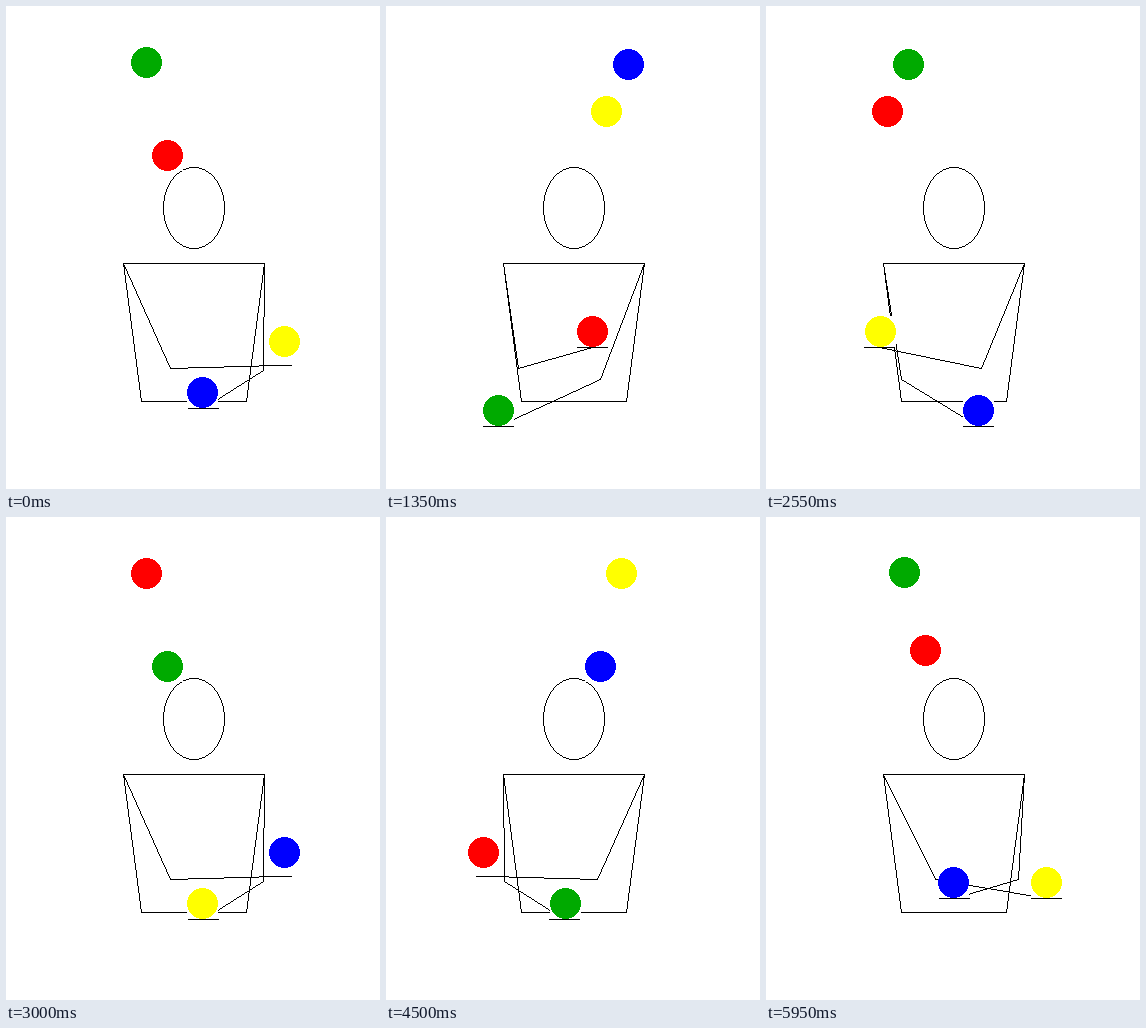
Animation of 374x483 px, one loop 6 s. Source, as an HTML page with a canvas:

```html
<!DOCTYPE html>
<html lang="en">
<head>
<meta charset="utf-8">
<title>Juggler</title>
<style>
html, body { margin: 0; width: 100%; height: 100%; overflow: hidden; background: #fff; }
canvas { display: block; }
</style>
</head>
<body>
<canvas id="stage" width="374" height="483"></canvas>
<script>
const ctx = document.getElementById('stage').getContext('2d');
const LOOP = 6000, STEP = 50, BEAT = 500;
const MID = 187.5, HAND_Y = 381, BALL_Y = 365, SWING = 61, HEIGHT = 310;
const REACH = 92.99, CATCH = 7.8;
// Left hand offsets from the middle: throw, catch, throw, ...
const SPOTS = [REACH, -CATCH, REACH, 0, -REACH, CATCH];
const COLORS = ['#ff0', '#0a0', '#00f', '#f00'];

const lerp = (a, b, u) => a + (b - a) * u;
const arc = u => 4 * u * (1 - u);
const mod = (a, n) => ((a % n) + n) % n;
const side = off => off > 0 ? 1 : -1;
const snapHand = off => side(off) * (Math.floor(Math.abs(off)) + 0.5);
const snapBall = off => side(off) * (Math.floor(Math.abs(off) + 0.5) - 0.5);

// Left hand; the right one is its mirror image three beats later.
function hand(time) {
  const p = mod(time, LOOP / 2) / BEAT;
  const i = Math.floor(p), u = p - i;
  return {
    off: lerp(SPOTS[i], SPOTS[(i + 1) % 6], u),
    y: Math.floor(HAND_Y + (i % 2 ? 1 : -1) * SWING * arc(u))
  };
}

function ball(time) {
  const t = mod(time, LOOP);
  const start = t < 3500 ? 0 : 3500;
  const u = (t - start) / 2000;
  if (u < 1) {
    return {
      off: snapBall(lerp(REACH, CATCH, u)),
      y: Math.round(BALL_Y - HEIGHT * arc(u))
    };
  }
  const right = start === 0;
  const h = hand(right ? t + 1500 : t);
  return { off: snapBall(h.off) * (right ? -1 : 1), y: h.y - 16 };
}

// Hard-edged line, one pixel wide
function line(x0, y0, x1, y1) {
  const n = Math.max(Math.abs(x1 - x0), Math.abs(y1 - y0)) || 1;
  for (let i = 0; i <= n; i++) {
    ctx.fillRect(Math.round(lerp(x0, x1, i / n)), Math.round(lerp(y0, y1, i / n)), 1, 1);
  }
}

function path(points) {
  for (let i = 1; i < points.length; i++) line(...points[i - 1], ...points[i]);
}

function head() {
  const rx = 30.5, ry = 40.5, cy = 201.5;
  for (let x = -rx; x <= rx; x++) {
    const y = ry * Math.sqrt(1 - (x / rx) ** 2);
    ctx.fillRect(MID + x, Math.round(cy - y), 1, 1);
    ctx.fillRect(MID + x, Math.round(cy + y), 1, 1);
  }
  for (let y = -ry; y <= ry; y++) {
    const x = rx * Math.sqrt(1 - (y / ry) ** 2);
    ctx.fillRect(Math.round(MID - x), cy + y, 1, 1);
    ctx.fillRect(Math.round(MID + x), cy + y, 1, 1);
  }
}

function arm(time, mirrored) {
  const h = hand(time);
  const x = MID + snapHand(h.off);
  const elbowX = Math.max(95, Math.floor(x / 2 + 29.5));
  const elbowY = Math.max(362, Math.floor(h.y / 2 + 163.9));
  const flip = v => mirrored ? 2 * MID - v : v;
  path([[flip(117), 257], [flip(elbowX), elbowY], [flip(x), h.y]]);
  ctx.fillRect(flip(x) - 15, h.y, 31, 1);
}

function disc(x, y, color) {
  ctx.fillStyle = '#fff';
  ctx.fillRect(x - 15, y - 15, 31, 31);
  ctx.fillStyle = color;
  for (let d = -15; d <= 15; d++) {
    const w = Math.round(Math.sqrt(15.5 ** 2 - d * d) - 0.5);
    ctx.fillRect(x - w, y + d, 2 * w + 1, 1);
  }
}

function draw(ms) {
  const time = Math.floor(mod(ms, LOOP) / STEP) * STEP + STEP;
  ctx.fillStyle = '#fff';
  ctx.fillRect(0, 0, 374, 483);
  ctx.fillStyle = '#000';
  head();
  path([[117, 257], [258, 257], [240, 395], [135, 395], [117, 257]]);
  arm(time, false);
  arm(time + 1500, true);
  COLORS.forEach((color, i) => {
    const b = ball(time - i * 1500);
    disc(MID + (i % 2 ? -b.off : b.off), b.y, color);
  });
}

const begin = performance.now();
function tick() {
  draw(performance.now() - begin);
  requestAnimationFrame(tick);
}
draw(0);
requestAnimationFrame(tick);
</script>
</body>
</html>
```
